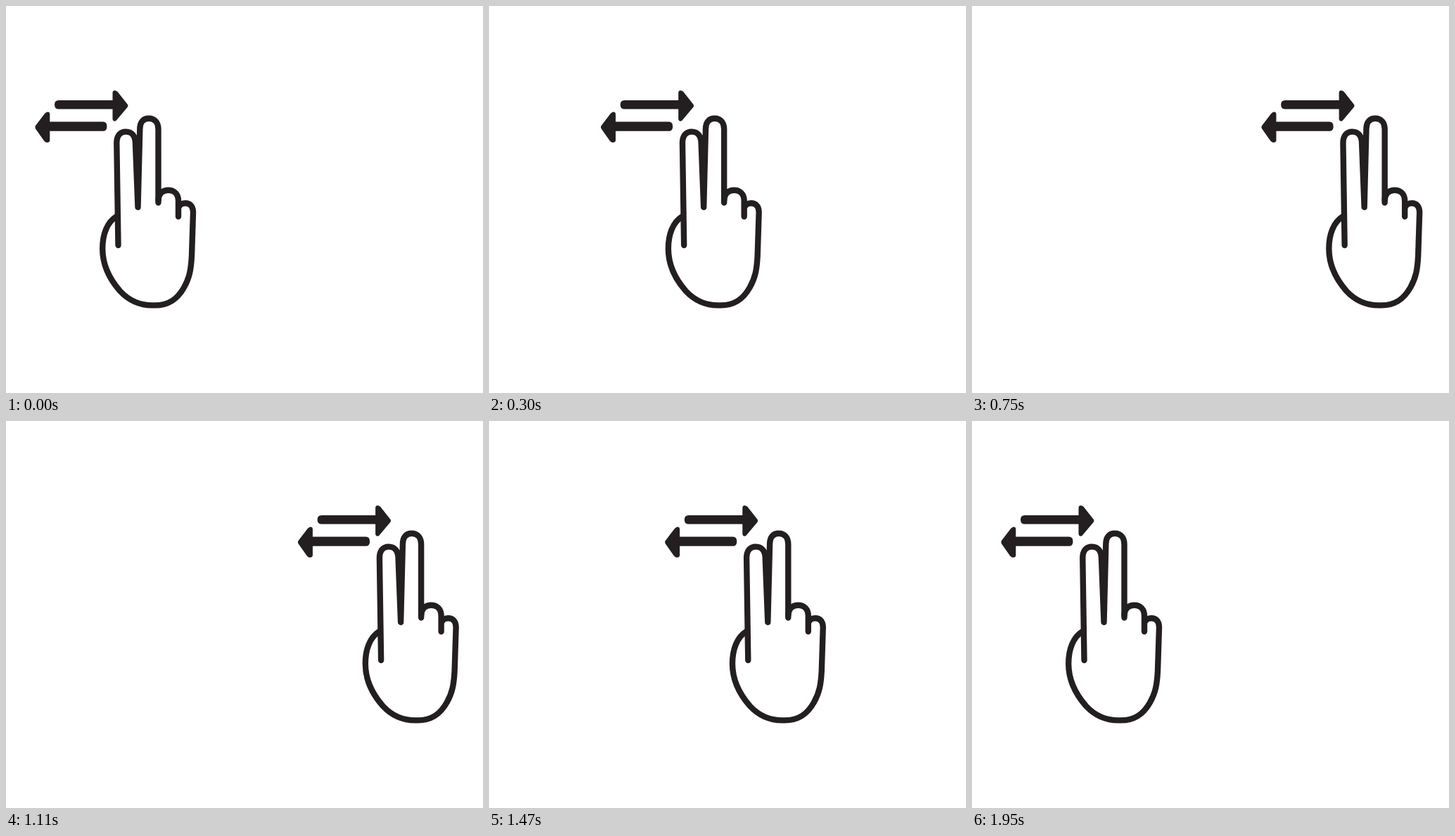
An HTML page that plays this animation: 678x550 px, repeating every 2.22 s.

```html
<!DOCTYPE html>
<html lang="en">
<head>
<meta charset="utf-8">
<title>Two-finger swipe</title>
<style>
  html, body { margin: 0; width: 100%; height: 100%; overflow: hidden; background: #fff; }
  svg { display: block; width: 678px; height: 550px; }
  .hand { fill: none; stroke: #231f20; stroke-width: 8.4; stroke-linecap: round; stroke-linejoin: round; }
  .arrows { fill: #231f20; }
</style>
</head>
<body>
<svg viewBox="0 0 678 550">
  <g id="swipe">
    <g class="arrows">
      <path d="M153 134 H75 Q69 134 69 140.2 Q69 146.5 75 146.5 H151.5 V161 Q152.5 165 156.5 163 L172.5 144 Q174.3 141.6 172.5 139.5 L158.5 121.8 Q156.5 120 154 120 Q151.5 120.3 151.5 123 V134 Z"/>
      <path d="M61 164.6 H138 Q143.5 164.6 143.5 171.2 Q143.5 177.8 138 177.8 H62.3 V191 Q62 194 58.5 194 Q56 194 54 191.5 L42 174.5 Q40.5 172.3 42 170 L55 153 Q57.5 150 60 150.5 Q62.3 151 62.3 153.5 V164.6 Z"/>
    </g>
    <g class="hand">
      <path d="M159.5 340 L157.3 195 C157.3 184.5 162 178.6 170.5 178.6 C179 178.6 184 185 184 196 L187.5 286 L190.3 175 C190.3 165 195 159.8 203 159.8 C211.5 159.8 216.5 166 216.5 175 V279.5"/>
      <path d="M216.5 276 C217 266 223 261.7 230.5 261.7 C239 261.7 245 267 245 277 V299.3"/>
      <path d="M246 285 C248 281.3 251 280.3 255 280.3 C262 280.3 266 285 266 293 L264 355 C263 374 261 386 253 400 C244 416 232 425.4 212 425.4 H208 C190 425.4 175 419 162 405 C148 389 137.2 368 137.2 345 C137.2 324 144 307 157 299"/>
    </g>
  </g>
</svg>
<script>
  const LOOP = 2220, STEP = 30, REACH = 375;
  const OUT = 804, BACK_AT = 1080, BACK = 844;
  const swipe = document.getElementById('swipe');

  function ease(p) {
    p = Math.min(1, Math.max(0, p));
    return p * p * (3 - 2 * p);
  }

  function draw() {
    const t = Math.floor(performance.now() % LOOP / STEP) * STEP;
    const x = REACH * (ease(t / OUT) - ease((t - BACK_AT) / BACK));
    swipe.setAttribute('transform', `translate(${x.toFixed(2)} 0)`);
    requestAnimationFrame(draw);
  }
  draw();
</script>
</body>
</html>
```
